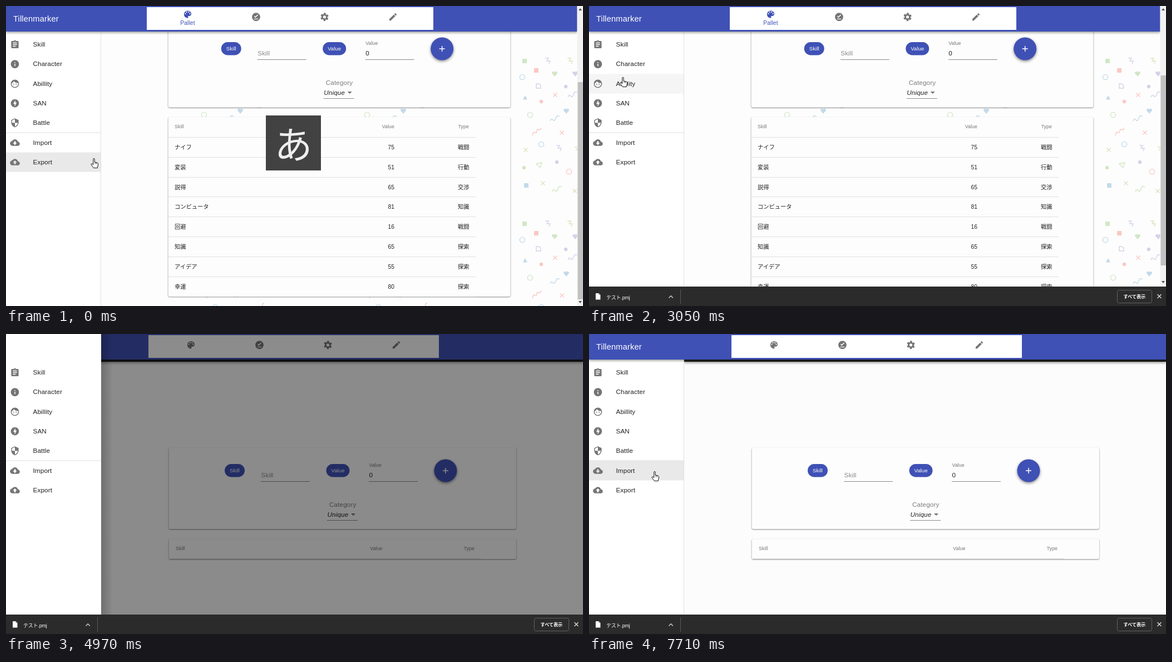
Write an HTML page that moves like this. It is 1037 by 540 pixels and loops after 8000 ms.

```html
<!DOCTYPE html>
<html lang="ja">
<meta charset="utf-8">
<style>
html, body { margin: 0; width: 100%; height: 100%; overflow: hidden; background: #fff }
svg { display: block }
text { font: 11.73px 'Liberation Sans', 'Noto Sans CJK JP', sans-serif; letter-spacing: .01em; white-space: pre }
.card { fill: #fdfdfd; filter: drop-shadow(0 1px 1px #0006) drop-shadow(0 0 .5px #0003) }
.fab { fill: #3f51b5; filter: drop-shadow(0 2px 2.5px #0007) }
.bar { filter: drop-shadow(0 2px 2px #0006) }
</style>
<svg id="stage" width="1037" height="540" viewBox="0 0 1037 540"></svg>
<script>
const BLUE = '#3f51b5', GREY = '#757575', INK = '#212121', LOOP = 8000;

const rect = (x, y, w, h, fill, more = '') => `<rect x="${x}" y="${y}" width="${w}" height="${h}" fill="${fill}" ${more}/>`;
const circle = (x, y, r, more = '') => `<circle cx="${x}" cy="${y}" r="${r}" ${more}/>`;
const path = (d, more = '') => `<path d="${d}" ${more}/>`;
const line = (d, stroke, width = 1) => path(d, `fill="none" stroke="${stroke}" stroke-width="${width}"`);
const group = (id, body, more = '') => `<g id="${id}" ${more}>${body}</g>`;
const text = (x, y, s, { size = 11.73, fill = INK, anchor = 'start', css = '' } = {}) =>
  `<text x="${x}" y="${y}" fill="${fill}" text-anchor="${anchor}" style="font-size:${size}px;${css}">${s}</text>`;

// 24-unit icons
const disc = 'M12 2C6.48 2 2 6.48 2 12s4.48 10 10 10 10-4.48 10-10S17.52 2 12 2z';
const cloud = 'M19.35 10.04C18.67 6.59 15.64 4 12 4 9.11 4 6.6 5.64 5.35 8.04 2.34 8.36 0 10.91 0 14c0 3.31 2.69 6 6 6h13c2.76 0 5-2.24 5-5 0-2.64-2.05-4.78-4.65-4.96z';
const hole = (x, y, r) => `M${x - r} ${y}a${r} ${r} 0 1 0 ${2 * r} 0a${r} ${r} 0 1 0 ${-2 * r} 0z`;
const icons = {
  clipboard: path('M19 3h-4.18C14.4 1.84 13.3 1 12 1c-1.3 0-2.4.84-2.82 2H5c-1.1 0-2 .9-2 2v14c0 1.1.9 2 2 2h14c1.1 0 2-.9 2-2V5c0-1.1-.9-2-2-2z' + hole(12, 4, 1) + 'M14 17H7v-2h7zM17 13H7v-2h10zM17 9H7V7h10z'),
  info: path(disc + 'M13 17h-2v-6h2zM13 9h-2V7h2z'),
  face: path(disc + 'M12 20c-4.41 0-8-3.59-8-8 0-.29.02-.58.05-.86 2.36-1.05 4.23-2.98 5.21-5.37C11.07 8.33 14.05 10 17.42 10c.78 0 1.53-.09 2.25-.26.21.71.33 1.47.33 2.26 0 4.41-3.59 8-8 8z' + hole(9, 13, 1.25) + hole(15, 13, 1.25)),
  bolt: path(disc + 'M11.48 20v-6.26H8L13 4v6.26h3.35z'),
  shield: path('M12 1L3 5v6c0 5.55 3.84 10.74 9 12 5.16-1.26 9-6.45 9-12V5zM12 12h7c-.53 4.12-3.28 7.79-7 8.94V12H5V6.3l7-3.11z'),
  download: path(cloud + 'M17 13l-5 5-5-5h3V9h4v4z'),
  upload: path(cloud + 'M14 13v4h-4v-4H7l5-5 5 5z'),
  palette: path('M12 3c-4.97 0-9 4.03-9 9s4.03 9 9 9c.83 0 1.5-.67 1.5-1.5 0-.39-.15-.74-.39-1.01-.23-.26-.38-.61-.38-.99 0-.83.67-1.5 1.5-1.5H16c2.76 0 5-2.24 5-5 0-4.42-4.03-8-9-8z' + hole(6.5, 10.5, 1.5) + hole(9.5, 6.5, 1.5) + hole(14.5, 6.5, 1.5) + hole(17.5, 10.5, 1.5)),
  check: path(disc + 'M17 18H7v-2h10zM10.3 14L7 10.7l1.4-1.4 1.9 1.9 5.3-5.3L17 7.3z'),
  gear: `<g fill="none" stroke="${GREY}">${circle(12, 12, 5.5, 'stroke-width="4"')}${circle(12, 12, 8.2, 'stroke-width="3.6" pathLength="60" stroke-dasharray="5.4 4.6" transform="rotate(74 12 12)"')}</g>`,
  pencil: path('M3 17.25V21h3.75L17.81 9.94l-3.75-3.75zM20.71 7.04c.39-.39.39-1.02 0-1.41l-2.34-2.34c-.39-.39-1.02-.39-1.41 0l-1.83 1.83 3.75 3.75z')
};
const icon = (name, x, y, fill = GREY) =>
  `<g transform="translate(${x - 8.8} ${y - 8.8}) scale(.733)" fill="${fill}" fill-rule="evenodd">${icons[name]}</g>`;

// Confetti wallpaper, one 293px tile
const tint = { r: '#fac8c4', g: '#d3e6c6', b: '#c3daea', p: '#d5d2ea', o: '#e2e0bd' };
const confetti = {
  gem: ['M-5-1C-5-5-1-5 0-3 1-5 5-5 5-1L0 5z', 1], dot: [hole(0, 0, 3.2), 1],
  block: ['M-4-4H4V4H-4z', 1], wedge: ['M-4 3.5L0-4 4 3.5z', 1],
  ring: [hole(0, 0, 4.6)], box: ['M-3.5-3.5H3.5V3.5H-3.5z'], tri: ['M-5-2L5-4 2 5z'],
  cross: ['M-3.5-3.5L3.5 3.5M3.5-3.5L-3.5 3.5'], dee: ['M-4 4V-4H0Q4-3 4 1V4z'],
  zig: ['M-8 6l2-6 5 1 2-6 5 1 2-4'], step: ['M-5-5h6l-3 5h6l-2 5'], wave: ['M-9 4q2-6 5-2t5-3 7-3']
};
const scatter = (color, kind, ...xy) => {
  const [d, solid] = confetti[kind], c = tint[color];
  let out = '';
  for (let i = 0; i < xy.length; i += 2)
    out += path(d, `transform="translate(${xy[i]} ${xy[i + 1]})" fill="${solid ? c : 'none'}" stroke="${solid ? 'none' : c}" stroke-width="1.4"`);
  return out;
};
const wallpaper = `<pattern id="paper" patternUnits="userSpaceOnUse" x="171" y="46" width="293" height="293">${
  [['r', 'gem', 201, 324, 388, 188, 336, 49], ['g', 'gem', 229, 76, 417, 188], ['b', 'gem', 250, 143],
   ['p', 'gem', 266, 76, 242, 321, 174, 310, 405, 167], ['o', 'gem', 367, 129],
   ['r', 'dot', 205, 126, 344, 77], ['p', 'dot', 249, 99, 233, 235, 412, 308, 360, 186], ['g', 'dot', 174, 245, 291, 270],
   ['r', 'block', 196, 70], ['g', 'block', 175, 53, 432, 108, 374, 243, 331, 196], ['b', 'block', 178, 277], ['p', 'block', 450, 187],
   ['b', 'wedge', 176, 119, 284, 134, 436, 137], ['p', 'wedge', 390, 70, 394, 266],
   ['b', 'ring', 171, 82, 205, 203, 208, 305, 371, 98], ['g', 'ring', 185, 150, 402, 142], ['r', 'ring', 255, 252],
   ['r', 'box', 397, 114], ['p', 'box', 354, 224, 402, 335], ['o', 'box', 408, 228],
   ['r', 'tri', 275, 168, 275, 315, 432, 78, 377, 211], ['g', 'tri', 201, 240], ['p', 'tri', 341, 243], ['b', 'tri', 423, 282],
   ['r', 'cross', 230, 114, 242, 182, 436, 232, 367, 290, 338, 309], ['o', 'cross', 177, 213, 265, 287],
   ['g', 'cross', 208, 273, 368, 157], ['p', 'cross', 284, 238],
   ['p', 'dee', 200, 98], ['g', 'dee', 409, 97, 366, 331],
   ['r', 'zig', 197, 181, 297, 196, 405, 196], ['p', 'step', 217, 53, 237, 210, 357, 61, 338, 155], ['o', 'step', 257, 53, 270, 213], ['g', 'step', 337, 280],
   ['p', 'wave', 262, 114, 386, 303], ['b', 'wave', 230, 157], ['g', 'wave', 234, 284, 414, 258]]
    .map(a => scatter(...a)).join('')}</pattern>`;

const chip = (x, w, label) => rect(x, 234, w, 23.5, BLUE, 'rx="11.75"') +
  text(x + w / 2, 249, label, { size: 9.53, fill: '#fff', anchor: 'middle', css: 'font-weight:500' });
const form = dx => `<g transform="translate(${dx} 0)">` +
  chip(393, 36, 'Skill') + chip(575.5, 42, 'Value') +
  text(458.5, 258, 'Skill', { fill: '#8a8a8a' }) + line('M458 265.5h88M652 265.5h88M577 335.5h55', '#8c8c8c') +
  text(652.5, 239.3, 'Value', { size: 8.8, fill: GREY }) + text(652.5, 258, '0') +
  circle(790, 246, 20.5, 'class="fab"') + line('M785 246h10M790 241v10', '#fff', 1.5) +
  text(581, 311, 'Category', { fill: '#7d7d7d' }) + text(577.5, 328.6, 'Unique', { css: 'font-style:italic' }) +
  path('M620 323h8l-4 4z', `fill="${GREY}"`) + '</g>';
const tableHead = (y, x, value, type) => {
  const o = { size: 8.8, fill: GREY };
  return text(x, y, 'Skill', o) + text(value, y, 'Value', { ...o, anchor: 'end' }) + text(type, y, 'Type', { ...o, anchor: 'end' });
};
const card = (x, y, w, h) => rect(x, y, w, h, '', 'rx="3" class="card"');
const header = (w, x, tabW, labelled) => rect(0, 0, w, 46, BLUE, 'class="bar"') + rect(x, 2, tabW, 41, '#fff') +
  text(13, 28, 'Tillenmarker', { size: 14.67, fill: '#fff' }) +
  ['palette', 'check', 'gear', 'pencil'].map((n, i) => {
    const on = labelled && !i;
    return icon(n, (labelled ? 326.5 : 332.5) + 123 * i, on ? 15 : 19.7, on ? BLUE : GREY);
  }).join('') + (labelled ? text(326.5, 34, 'Pallet', { size: 10.27, fill: BLUE, anchor: 'middle' }) : '');
const sideBase = rect(0, 46, 171, 494, '#fff') + line('M170.5 46v494', '#e0e0e0');

const skills = [['ナイフ', 75, '戦闘'], ['変装', 51, '行動'], ['説得', 65, '交渉'], ['コンピュータ', 81, '知識'],
  ['回避', 16, '戦闘'], ['知識', 65, '探索'], ['アイデア', 55, '探索'], ['幸運', 80, '探索']];
const rows = skills.map(([name, value, type], i) => {
  const y = 257.8 + 35.85 * i, o = { size: 10.27, css: 'letter-spacing:0' }, end = { ...o, anchor: 'end' };
  return line(`M291.5 ${Math.round(y - 22) + .5}H844`, '#e0e0e0') + text(303, y, name, o) + text(698, y, value, end) + text(832.5, y, type, end);
}).join('');
const filledPage = rect(0, 0, 1037, 540, '#fdfdfd') + rect(171, 46, 856, 494, 'url(#paper)') +
  card(291.5, 30, 615, 152.5) + `<g transform="translate(0 -169)">${form(-6.3)}</g>` +
  card(291.5, 200, 615, 323) + tableHead(220, 303, 698, 832) + rows + line('M291.5 523H844', '#e0e0e0') +
  sideBase + header(1026.5, 253, 515, true) +
  rect(1026.5, 0, 10.5, 540, '#f1f1f1') + rect(1027.5, 0, 9.5, 0, '#c1c1c1', 'id="thumb"') +
  path('M1029 8l3-4 3 4z', 'fill="#505050"') + path('M1029-2h6l-3 4z', 'fill="#505050" id="scrollDown"');
const freshPage = rect(0, 0, 1037, 540, '#fcfcfc') + card(292.5, 205, 624.5, 146) + form(0) +
  card(292.5, 369, 624.5, 36) + tableHead(389, 305, 676.5, 842) + line('M293 404.5H854', '#e0e0e0') +
  rect(171, 46, 866, 4, INK, 'class="bar"') + sideBase + header(1037, 256, 522, false);

const items = [['clipboard', 'Skill'], ['info', 'Character'], ['face', 'Abillity'], ['bolt', 'SAN'],
  ['shield', 'Battle'], ['download', 'Import'], ['upload', 'Export']];
const rowTop = i => 52 + 35.2 * i + (i > 4 ? .3 : 0);
const menu = rect(0, 0, 170, 35.2, '#000', 'id="hover"') + line('M0 228h171', '#dedede') +
  items.map(([n, label], i) => icon(n, 16, rowTop(i) + 17.5) + text(48.5, rowTop(i) + 21.2, label)).join('');

const shelf = rect(0, 0, 1037, 35, '#2b2b2b') +
  group('ring', circle(16.3, 18, 9, 'fill="#484848" stroke="#ccc" stroke-width="1.4"')) +
  path('M12 12h5.5l3 3v8.5h-8.5z', 'fill="#fff"') + path('M17.5 12v3h3z', 'fill="#999"') +
  text(31, 23, 'テスト.pmj', { size: 9, fill: '#fff', css: 'letter-spacing:-.2px' }) +
  line('M143.5 20.5l3.7-3.7 3.7 3.7', '#ccc', 1.4) + line('M164.5 5v26', '#5a5a5a') +
  rect(949.5, 6.5, 62, 23, 'none', 'rx="3" stroke="#606060"') +
  text(980.3, 21, 'すべて表示', { size: 8.2, fill: '#fff', anchor: 'middle', css: 'font-weight:700;letter-spacing:-.1px' }) +
  line('M1021.5 14l7 7m0-7l-7 7', '#ddd', 1.4);

const ime = rect(467, 197, 99, 99, '#424242') + text(516.5, 275, 'あ', { size: 68, fill: '#eee', anchor: 'middle', css: 'font-weight:300;letter-spacing:0' });
const status = rect(-2, 489, 155, 18, '#f2f2f2', 'rx="2" stroke="#ccc"') +
  text(5, 500.5, 'localhost を待機しています...', { size: 8.8, fill: '#555' });
const outlined = 'fill="#fff" stroke="#111" stroke-linejoin="round"';
const hand = path('M-1.2 1.2Q0-.7 1.2 1.2V7l5 1.2Q8 9 7.6 11L6.3 17.5H-.5L-5 11.5Q-5 9.3-3 10l1.8 1.6z', outlined) + line('M2.2 7.5v2.7M4.6 8v2.6', '#111', .8);
const arrow = path('M0 0V12.2L2.8 9.6 4.8 14.3 6.8 13.4 4.8 8.8H8.4z', outlined);

stage.innerHTML = `<defs>${wallpaper}<linearGradient id="edge"><stop stop-color="#000" stop-opacity=".2"/><stop offset="1" stop-color="#000" stop-opacity="0"/></linearGradient></defs>` +
  group('filled', filledPage) + group('fresh', freshPage) +
  group('drawer', rect(171, 0, 866, 505, '#000', 'id="dim"') + rect(171, 0, 21, 505, 'url(#edge)') + rect(0, 0, 171, 505, '#fff')) +
  group('menu', menu) + group('ime', ime) + group('status', status) + group('shelf', shelf) +
  group('pointer', group('hand', hand) + group('arrow', arrow));

const $ = id => document.getElementById(id);
const show = (id, on) => $(id).style.display = on ? '' : 'none';
const set = (id, attrs) => { for (const k in attrs) $(id).setAttribute(k, attrs[k]); };
const ramp = (t, a, b) => Math.min(1, Math.max(0, (t - a) / (b - a)));
const smooth = p => p * p * (3 - 2 * p);
const mix = (a, b, p) => a + (b - a) * p;

const bursts = [[130, 1120, 8], [1390, 2350, 8], [2480, 3050, 5], [3330, 3880, 5], [4690, 5680, 8], [6490, 6490, 1], [6790, 7710, 7]];
function recorded(t) {
  const burst = bursts.filter(b => b[0] <= t).pop();
  if (!burst) return 0;
  const [a, b, n] = burst, step = (b - a) / (n - 1 || 1);
  return step ? Math.min(b, a + Math.floor((t - a) / step + .1) * step) : a;
}

// Pointer path: time, x, y
const trail = [[0, 158, 274], [2380, 158, 274], [3050, 61, 128], [3200, 61, 128], [3880, 45, -25],
  [5000, 45, -25], [5680, 289, 110], [6650, 289, 110], [7710, 118, 247], [LOOP, 118, 247]];
function pointerAt(t) {
  const i = trail.findIndex((k, n) => n && t <= k[0]), a = trail[i - 1], b = trail[i];
  const p = smooth(ramp(t, a[0], b[0]));
  return [mix(a[1], b[1], p), mix(a[2], b[2], p)];
}

function draw(now) {
  const t = recorded(now % LOOP), loaded = t >= 4800, modal = loaded && t < 6490;
  show('filled', t < 4690);
  show('fresh', loaded);
  show('drawer', modal);
  show('menu', t < 4690 || loaded);
  set('dim', { opacity: .5 * smooth(ramp(t, 4791, 5016)) });

  const up = smooth(ramp(t, 350, 700));
  set('shelf', { transform: `translate(0 ${540 - 35 * up})` });
  const top = mix(137, 125, up);
  set('thumb', { y: top, height: mix(528, 467, up) - top });
  set('scrollDown', { transform: `translate(0 ${mix(533, 497, up)})` });
  set('ime', { opacity: 1 - ramp(t, 100, 450) });
  const beat = t < 978 ? 1 : .5 + .5 * Math.cos((t - 978) / 556 * 2 * Math.PI);
  set('ring', { opacity: t < 2924 ? beat : 0 });
  show('status', t >= 3700 && !loaded);

  const [x, y] = pointerAt(t);
  const row = modal || x > 170 ? -1 : items.findIndex((_, i) => y >= rowTop(i) && y < rowTop(i) + 35.2);
  set('pointer', { transform: `translate(${x} ${y})` });
  show('hand', row >= 0);
  show('arrow', row < 0);
  set('hover', { y: rowTop(Math.max(row, 0)), opacity: row < 0 ? 0 : row > 4 ? .085 : .04 });
}

const start = performance.now();
(function tick() {
  draw(performance.now() - start);
  requestAnimationFrame(tick);
})();
</script>
</html>
```
